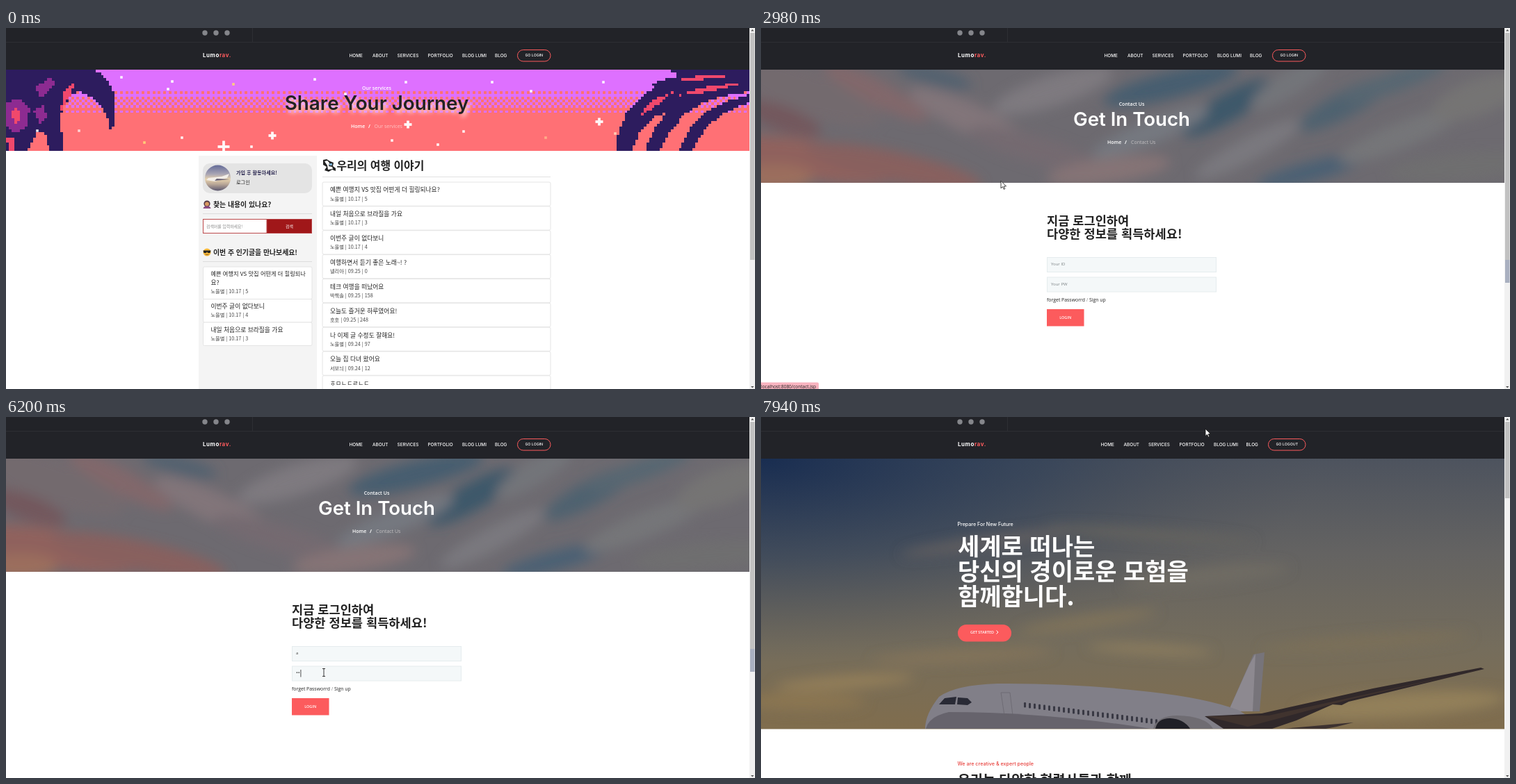
Recreate the animation shown at these times as an HTML page with a canvas. Size 1077x520 px, loop 8 s.

```html
<!DOCTYPE html>
<html lang="ko">
<head>
<meta charset="utf-8">
<style>
html, body { margin: 0; width: 100%; height: 100%; overflow: hidden; background: #fff; }
canvas { position: absolute; left: 0; top: 60px; width: 1069px; height: 117px; image-rendering: pixelated; }
svg { position: absolute; left: 0; top: 0; }
text { font-family: "Noto Sans CJK KR", "Noto Sans CJK", "Noto Sans", sans-serif; fill: #222; white-space: pre; }
.h { font-family: Inter, sans-serif; font-weight: 500; }
.o { font-family: "Open Sans", sans-serif; }
.b { font-weight: 700; }
.s { font-weight: 600; }
.m { text-anchor: middle; }
.w { fill: #fff; }
.glow { filter: drop-shadow(3px 4px 3px #ffffffd0); }
</style>
</head>
<body>
<canvas id="art" width="274" height="30"></canvas>
<svg id="stage" width="1077" height="520" viewBox="0 0 1077 520"></svg>
<script>
const LOOP = 8000, CELL = 3.9;
const CORAL = '#fc5b5d', DARK = '#222328';

const text = (x, y, size, str, cls = '', attrs = '') =>
  `<text x="${x}" y="${y}" font-size="${size}" class="${cls}" ${attrs}>${str}</text>`;
const rect = (x, y, w, h, fill, attrs = '') =>
  `<rect x="${x}" y="${y}" width="${w}" height="${h}" fill="${fill}" ${attrs}/>`;
const path = (d, fill, attrs = '') => `<path d="${d}" fill="${fill}" ${attrs}/>`;
const circle = (x, y, r, fill) => `<circle cx="${x}" cy="${y}" r="${r}" fill="${fill}"/>`;
const cloud = ([x, y, rx, ry, fill, turn = 0]) =>
  `<ellipse rx="${rx}" ry="${ry}" fill="${fill}" transform="translate(${x} ${y}) rotate(${turn})"/>`;
const group = (id, ...parts) => `<g id="${id}">${parts.join('')}</g>`;

// Header
const nav = (id, xs, left, label) => group(id,
  ['HOME', 'ABOUT', 'SERVICES', 'PORTFOLIO', 'BLOG LUMI', 'BLOG']
    .map((item, i) => text(xs[i], 42, 6.4, item, 'h w')).join(''),
  rect(left, 31.5, 783 - left, 16.5, 'none', `rx="8.2" stroke="${CORAL}"`),
  text((left + 783) / 2, 41.4, 5.3, label, 'h w m'));

const header = () => rect(0, 0, 1069, 60, DARK)
  + rect(0, 20, 1069, 1, '#2d2e33') + rect(354, 0, 1, 20, '#2d2e33')
  + [286, 302, 318].map(x => circle(x, 7, 3.7, '#85868b')).join('')
  + text(283, 42, 8, `Lumo<tspan fill="${CORAL}">rav.</tspan>`, 'h b w', 'letter-spacing=".55"')
  + nav('navGuest', [493.5, 527, 562.5, 606.5, 656, 703], 735.5, 'GO LOGIN')
  + nav('navMember', [488.5, 521.5, 557, 601.5, 651, 697.5], 729.5, 'GO LOGOUT');

// Community page
const GHOST = '노을별';
const POLL = '예쁜 여행지 VS 맛집 어떤게 더 힐링되나';
const BRAZIL = ['내일 처음으로 브라질을 가요', GHOST + ' | 10.17 | 3'];
const NONE = ['이번주 글이 없다보니', GHOST + ' | 10.17 | 4'];
const POSTS = [
  [POLL + '요?', GHOST + ' | 10.17 | 5'], BRAZIL, NONE,
  ['여행하면서 듣기 좋은 노래~! ?', '넬리아 | 09.25 | 0'],
  ['테크 여행을 떠났어요', '박책솔 | 09.25 | 158'],
  ['오늘도 즐거운 하루였어요!', '호호 | 09.25 | 248'],
  ['나 이제 글 수정도 잘해요!', GHOST + ' | 09.24 | 97'],
  ['오늘 집 다녀 왔어요', '서보늬 | 09.24 | 12'],
  ['ㅎㅁㄴㄷㄹㄴㄷ', '']
];
const card = (x, y, w, h) => rect(x + .5, y + .5, w, h, '#fff', 'rx="2" stroke="#e4e4e4"');
const post = (x, y, [title, meta]) => text(x, y, 8.75, title) + text(x, y + 12.2, 7.2, meta, '', 'opacity=".85"');
const sideTitle = (y, str) => text(298, y, 9.9, str, 'b') + rect(283, y + 9, 157, 1, '#dcdcdc');

// x, y, size, colour, kind (1 twinkles, 2 appears late), cross
const STARS = [
  [166, 71, 4, '#fff', 1], [239, 77, 4, '#fff'], [233, 88, 4, '#fff'], [327, 81, 4, '#ffd27a'],
  [444, 74, 4, '#fff'], [575, 78, 4, '#fff', 1], [699, 78, 4, '#fff'], [859, 78, 4, '#fff', 1],
  [755, 91, 4, '#fff'], [488, 95, 4, '#fff'], [199, 165, 4, '#ffd27a'], [253, 158, 4, '#fff', 1],
  [353, 171, 4, '#fff'], [555, 162, 4, '#fff', 1], [621, 168, 4, '#fff'], [658, 149, 4, '#fff', 1],
  [776, 158, 4, '#ffb08a'], [876, 152, 4, '#ffd0b8'], [105, 148, 4, '#ffd8d8'], [45, 148, 4, '#fff', 1],
  [313, 171, 17, '#fff', 0, 1], [383, 155, 11, '#fff', 0, 1], [578, 139, 11, '#fff', 0, 1],
  [853, 135, 11, '#fff', 0, 1], [490, 158, 11, '#fff', 2, 1]
];
const star = ([x, y, s, fill, kind = 0, cross]) => `<g data-kind="${kind}">` + (cross
  ? rect(x - s / 2, y - 1.9, s, 3.8, fill) + rect(x - 1.9, y - s / 2, 3.8, s, fill)
  : rect(x - 1.8, y - 1.8, 3.6, 3.6, fill)) + '</g>';

const community = () => group('page0',
  STARS.map(star).join(''),
  text(533, 88.6, 7, 'Our services', 'o w m s'),
  text(533, 118, 27.8, 'Share Your Journey', 'h m s glow'),
  text(496, 143.8, 7, 'Home', 'o w s') + text(521, 143.8, 7, '/', 'o w b'),
  text(529.5, 143.8, 7, 'Our services', 'o', 'style="fill:#ffc4c4"'),
  rect(0, 177, 1069, 343, '#fff'), rect(277, 184, 170, 336, '#f4f4f4'),
  rect(283, 195, 157, 43, '#e4e4e4', 'rx="10"'),
  circle(304.5, 216, 18.5, 'url(#avatar)'),
  path('M288 219L291 216L310 214L321 210L318 216L300 221Z', '#f3eee8'),
  path('M303 217L322 218L300 220Z', '#645c70'),
  text(331, 211.3, 7.1, '가입 후 활동하세요!', 'b', 'style="fill:#29264f"'),
  text(331, 225, 7.2, '로그인', '', 'font-weight="500"'),
  circle(289, 253, 4.6, '#563a46'), circle(289, 253.5, 3, '#d99a62'),
  path('M283.5 260Q284 256.5 289 256.5T294.5 260Z', '#8a4b83'),
  sideTitle(258, '찾는 내용이 있나요?'),
  rect(283.5, 275.5, 92, 20, '#fff', 'stroke="#bd4a4c"'),
  rect(375, 275.5, 64.5, 20, '#a01719', 'stroke="#b84446"'),
  text(288, 287.6, 5.9, '검색어를 입력하세요!', '', 'style="fill:#888"'),
  text(407.5, 287.6, 5.9, '검색', 'w m', 'font-weight="500"'),
  circle(289, 323, 5.5, '#f6b93b'),
  path('M283.5 320.5H294.5L293.5 324H290L289 322L288 324H284.5Z', '#222'),
  path('M286.5 325.8Q289 327.5 291.5 325.8', 'none', 'stroke="#7a4a18" stroke-width=".8"'),
  sideTitle(327, '이번 주 인기글을 만나보세요!'),
  card(283, 343.5, 156.5, 46.5), card(283, 390, 156.5, 33.5), card(283, 423.5, 156.5, 33.5),
  text(294.5, 357.3, 8.2, POLL), post(294.5, 370, ['요?', POSTS[0][1]]),
  post(294.5, 404, NONE), post(294.5, 438, BRAZIL),
  path('M456 190L461 189L466 192L471 194L470 199L474 202V206L469 204L464 207L458 205L461 200L456 197Z', '#222'),
  path('M458 192L462 191L465 194L464 199L469 200L470 203L463 204L462 198Z', '#fff'),
  rect(465, 195, 4, 3, '#78aacb'),
  text(475.5, 203.7, 15.9, '우리의 여행 이야기', 'b'),
  rect(455, 214, 328, 1, '#e2e2e2'),
  POSTS.map((p, i) => card(454.5, 221.5 + i * 34.85, 328, 34.3) + post(466, 236.4 + i * 34.85, p)).join(''));

// Login page
const DUSK = [
  [60, 90, 120, 34, '#746a6e', 20], [165, 92, 85, 18, '#85686a', 28], [250, 70, 55, 14, '#506070', 15],
  [30, 130, 60, 18, '#75545a', 20], [70, 190, 130, 28, '#96605a', 10], [190, 200, 130, 22, '#8d5e5b', 12],
  [20, 215, 55, 18, '#a4705a'], [300, 130, 95, 22, '#85777b', 25], [420, 90, 90, 22, '#817d82', -18],
  [395, 175, 100, 20, '#766a71', 16], [500, 205, 90, 18, '#8a7677', -8], [590, 82, 100, 19, '#415c70', -14],
  [670, 115, 75, 20, '#365569', -30], [560, 150, 90, 17, '#777b83', -22], [700, 175, 85, 17, '#7d7c81', -28],
  [760, 80, 65, 18, '#75777c', -32], [840, 110, 75, 18, '#48606f', -28], [910, 78, 80, 14, '#536672', -20],
  [790, 207, 80, 14, '#455f74', -15], [920, 155, 95, 19, '#77787a', -22], [1030, 100, 70, 26, '#777675', -20],
  [1010, 200, 110, 20, '#706f70', -5]
];
const field = y => rect(411.5, y + .5, 243, 21, '#f4f8f9', 'stroke="#e5ecee"');
const login = () => group('page1',
  rect(0, 60, 1069, 460, '#fff'),
  `<g clip-path="url(#banner)">${rect(0, 60, 1069, 163, '#6d6a70')}<g filter="url(#soft)" opacity=".85">${DUSK.map(cloud).join('')}</g></g>`,
  text(533, 112.3, 7, 'Contact Us', 'o w m s'),
  text(533, 141.3, 27.6, 'Get In Touch', 'h w m s'),
  text(498, 166.8, 7, 'Home', 'o w s') + text(523, 166.8, 7, '/', 'o w b'),
  text(532, 166.8, 7, 'Contact Us', 'o', 'style="fill:#c2bfc0"'),
  text(411, 283.6, 17.6, '지금 로그인하여', 'b'), text(411, 303.2, 17.6, '다양한 정보를 획득하세요!', 'b'),
  field(330), field(358.5),
  text(417, 342.4, 6, '', 'o', 'id="idText"'), text(417, 371, 6, '', 'o', 'id="pwText"'),
  rect(423, 335.5, .8, 10.5, '#222', 'id="caret"'),
  text(411, 394.4, 6.9, 'forget Passworrd <tspan fill="#888">/</tspan> Sign up', 'o'),
  rect(411, 405, 53.5, 24.5, CORAL, 'id="submit"'),
  text(437.7, 418.6, 5.4, 'LOGIN', 'o w m s'),
  group('status', rect(-3, 510.5, 86, 12, '#f8b3bf', 'rx="2"'), text(0, 518.6, 6.5, 'localhost:8080/contact.jsp', 'o')));

// Home page
const EVENING = [
  [330, 180, 130, 9, '#625f60', -8], [560, 170, 150, 8, '#65635f', 4], [470, 295, 100, 9, '#80735a', -8],
  [640, 230, 120, 12, '#706c63', -6], [120, 382, 100, 9, '#95805a', -4], [60, 410, 90, 12, '#8b7651'],
  [290, 345, 130, 8, '#85745a', -3], [560, 335, 90, 6, '#91805f', 3], [870, 325, 150, 9, '#7b7059', -4],
  [920, 415, 150, 18, '#93805a', -4]
];
const plane = () => path('M672 424L708 342L724 339L717 424Z', '#77747a')
  + path('M672 424L702 357L711 341L707 424Z', '#8d8990')
  + path('M236 449Q236 428 256 403Q279 386 340 384Q450 383 560 396Q640 405 686 422L730 449Z', '#817f88')
  + path('M237 449Q242 431 270 425Q410 425 560 449Z', '#66636c')
  + path('M256 414L264 405L281 403L279 414ZM283 404L297 405L303 411L297 415L282 414Z', '#292a35')
  + path('M345 397H358L362 430H350Z', 'none', 'stroke="#66646c" stroke-width=".7"')
  + Array.from({ length: 28 }, (_, i) => rect(378 + i * 7, 411 + i * .9, 3, 7.5, '#393944', 'rx="1.2"')).join('')
  + path('M638 431L720 427L880 391L1035 361L1040 363L900 397L845 410L835 415L822 414L770 437L735 449H665Z', '#30282a')
  + path('M640 431L730 430L1037 363L850 406L700 446Z', '#40332e')
  + path('M752 449L852 440L828 446L812 449Z', '#3d3230')
  + path('M564 449Q569 430 599 430Q640 431 650 449Z', '#6f6c72')
  + path('M567 449Q570 434 588 434Q608 435 617 449Z', '#202027');
const home = () => group('page2',
  rect(0, 60, 1069, 460, '#fff'),
  `<g clip-path="url(#hero)">${rect(0, 60, 1069, 390, 'url(#sky)')}${rect(0, 60, 1069, 390, 'url(#night)')}<g filter="url(#soft)">${EVENING.map(cloud).join('')}</g>${plane()}</g>`,
  text(700, 10.2, 6.8, 'My Page', 'o w s'),
  text(744, 10.2, 6.8, 'Blog Posting', 'o w s'),
  text(282.5, 157.3, 7.1, 'Prepare For New Future', 'h w'),
  ['세계로 떠나는', '당신의 경이로운 모험을', '함께합니다.'].map((s, i) => text(283, 198.5 + i * 36.2, 34, s, 'b w')).join(''),
  rect(283, 299, 77, 24.5, CORAL, 'rx="12.2"'),
  text(301, 312, 5.4, 'GET STARTED', 'o w s'),
  path('M338.5 307.5L341 310L338.5 312.5', 'none', 'stroke="#fff"'),
  text(282.5, 501.7, 7.2, 'We are creative &amp; expert people', 'h', 'style="fill:#e8433f"'),
  text(283, 529.6, 19.5, '우리는 다양한 협력사들과 함께', 'b'));

const stops = list => list.map(([at, color, alpha = 1]) =>
  `<stop offset="${at}" stop-color="${color}" stop-opacity="${alpha}"/>`).join('');
const defs = `<defs>
  <clipPath id="banner">${rect(0, 60, 1069, 163, '#000')}</clipPath>
  <clipPath id="hero">${rect(0, 60, 1069, 389.5, '#000')}</clipPath>
  <filter id="soft" x="-10%" y="-30%" width="120%" height="160%"><feGaussianBlur stdDeviation="9"/></filter>
  <linearGradient id="sky" x2="0" y2="1">${stops([[0, '#4d535e'], [.35, '#646362'], [.7, '#756d5c'], [1, '#806d4d']])}</linearGradient>
  <radialGradient id="night" cx="0" cy="0" r=".75">${stops([[0, '#162b50', .95], [.5, '#283b56', .55], [1, '#444a55', 0]])}</radialGradient>
  <linearGradient id="avatar" x2="0" y2="1">${stops([[0, '#646b98'], [.35, '#a9a5b4'], [.55, '#e8d3ae'], [.75, '#b7a596'], [1, '#5c5870']])}</linearGradient>
</defs>`;

const scrollbar = () => rect(1069, 0, 8, 520, '#f1f1f1')
  + rect(1070, 334, 6.5, 33, '#a9b0c0', 'id="thumbTail"') + rect(1070, 7, 6.5, 327, '#c1c1c1', 'id="thumb"')
  + path('M1071 4.5L1073.3 2L1075.5 4.5ZM1071 516L1073.3 518.5L1075.5 516Z', '#555');

const outline = 'stroke="#111" stroke-width=".8" stroke-linejoin="round"';
const pointer = () => group('cursor',
  path('M0 0V10.5L2.5 8.2L4.2 12L5.8 11.3L4.2 7.6H7.5Z', '#fff', 'id="arrow" ' + outline),
  path('M-1 .5Q0 -.8 1 .5V4.5L5 5.5V9L3.8 12H-1.5L-4 7.5L-3 6.5L-1 8Z', '#fff', 'id="hand" ' + outline),
  path('M-2 -5.5H2M0 -5.5V5.5M-2 5.5H2', 'none', 'id="beam" stroke="#222" stroke-width=".9"'));

const stage = document.getElementById('stage');
stage.innerHTML = defs + community() + login() + home() + header() + scrollbar() + pointer();
const $ = id => document.getElementById(id);
const show = (id, on) => { $(id).style.display = on ? '' : 'none'; };

// Pixel sunset behind the community heading
const art = $('art'), ctx = art.getContext('2d');
function eachCell(paint) {
  for (let j = 0; j < art.height; j++) for (let i = 0; i < art.width; i++) {
    const color = paint(i, j);
    if (color) { ctx.fillStyle = color; ctx.fillRect(i, j, 1, 1); }
  }
}
function pixelFill(color, d) {
  const shape = new Path2D(d);
  eachCell((i, j) => ctx.isPointInPath(shape, (i + .5) * CELL, 60 + (j + .5) * CELL) && color);
}
// Sparse dots, a checkerboard, then sparse dots in the other colour
function isOrange(i, j) {
  if (j === 8) return i % 2 === 0;
  if (j === 15) return i % 2 === 1;
  return j > 13 || j > 9 && (i + j) % 2 === 0;
}
function drawSunset(s) {
  eachCell((i, j) => isOrange(i, j) ? '#ff7075' : '#de70ff');
  const r = -s * .6;
  pixelFill('#2d1c5e', `M0 60H${128 + s / 3}L${146 + s / 2} 76L${155 + s} 95L${158 + s} 120L${152 + s} 152L${147 + s} 130L${138 + s / 2} 112L124 100L106 92L94 96L84 112L76 134L82 156V177H62L58 156L46 146L32 177H0Z`);
  pixelFill('#2d1c5e', `M${952 + r} 60H1069V92L1030 98L1000 108L974 126L952 152L940 177H918L930 148L952 120L930 130L910 152L900 177H${876 + r}L${880 + r} 148L${892 + r} 122L${908 + r} 104L${934 + r} 84L${926 + r} 80L${968 + r} 68Z`);
  pixelFill('#2d1c5e', 'M1069 106L1030 124L1004 146L986 177H966L984 144L1010 118L1040 104L1069 96Z');
  pixelFill('#8d2b91', 'M0 108L20 100L34 116L30 142L12 152L0 140ZM42 84L66 70L72 80L50 100ZM40 120L54 110L58 130L48 140Z');
  pixelFill('#f0486c', 'M8 122L16 112L20 132L12 140ZM0 156L12 160L10 177H4ZM84 92L98 78L94 94L78 120Z');
  pixelFill('#f0486c', 'M952 78L1000 68L1064 66L1000 74ZM962 98L1010 84L1069 78L1010 92ZM904 132L930 104L960 92L934 112Z');
}

const POINTER = [
  [140, 420, 476], [880, 355, 223], [1100, 355, 223], [1500, 345, 219.5], [3260, 345, 220.5],
  [4030, 494, 334], [4300, 494, 334], [4560, 457, 368], [6540, 457, 368], [7030, 454, 418],
  [7460, 454, 418], [7940, 639, 17]
];
const SWAY = [[140, 0], [880, 4], [1800, 4], [2490, -10]];
function along(keys, t) {
  const n = keys.findIndex(k => k[0] > t);
  if (n < 0) return keys[keys.length - 1].slice(1);
  if (!n) return keys[0].slice(1);
  const a = keys[n - 1], b = keys[n], p = (t - a[0]) / (b[0] - a[0]);
  return a.slice(1).map((v, i) => v + (b[i + 1] - v) * p);
}

function setField(id, value, hint, size) {
  const el = $(id);
  el.textContent = value || hint;
  el.style.fill = value ? '#333' : '#7d8486';
  el.setAttribute('font-size', value ? size : 6);
}

let lastSway;
function render(t) {
  const page = t < 2630 ? 0 : t < 7460 ? 1 : 2;
  for (let i = 0; i < 3; i++) show('page' + i, page === i);
  show('art', page === 0);
  show('navGuest', page < 2);
  show('navMember', page === 2);
  show('thumbTail', page === 1);
  $('thumb').setAttribute('height', page === 2 ? 110 : 327);

  if (page === 0) {
    const sway = Math.round(along(SWAY, t)[0]);
    if (sway !== lastSway) drawSunset(lastSway = sway);
    const glow = t < 500 ? .9 : t < 1900 ? .5 : .25;
    stage.querySelectorAll('[data-kind]').forEach(el => {
      const kind = +el.dataset.kind;
      el.style.opacity = kind === 1 ? glow : kind === 2 ? +(t >= 1800) : .95;
    });
  }

  const dots = [5800, 6010, 6220].filter(at => t >= at).length;
  setField('idText', t < 4300 ? '' : t < 5190 ? 'ㅁ' : 'a', 'Your ID', t < 5190 ? 6.5 : 5.6);
  setField('pwText', '•'.repeat(dots), 'Your PW', 7.5);
  show('caret', t >= 4100 && t < 6540);
  $('caret').setAttribute('x', t < 4300 ? 417 : t < 5190 ? 423.3 : t < 5390 ? 421 : 417.5 + dots * 3);
  $('caret').setAttribute('y', t < 5390 ? 335.5 : 364);
  show('status', t < 3260);

  const [x, y] = along(POINTER, t);
  const hover = page === 1 && y > 405;
  const submit = $('submit');
  submit.setAttribute('fill', hover ? '#e10b0d' : CORAL);
  submit.setAttribute('width', hover ? 52.5 : 53.5);
  submit.setAttribute('height', hover ? 23 : 24.5);
  const kind = page === 0 && t > 1100 && x < 351 ? 'hand'
    : page === 1 && x > 411 && y > 329 && y < 381 ? 'beam' : 'arrow';
  ['arrow', 'hand', 'beam'].forEach(id => show(id, id === kind));
  show('cursor', t >= 140);
  $('cursor').setAttribute('transform', `translate(${x} ${y})`);
}

const start = performance.now();
(function tick() {
  render((performance.now() - start) % LOOP);
  requestAnimationFrame(tick);
})();
</script>
</body>
</html>
```
